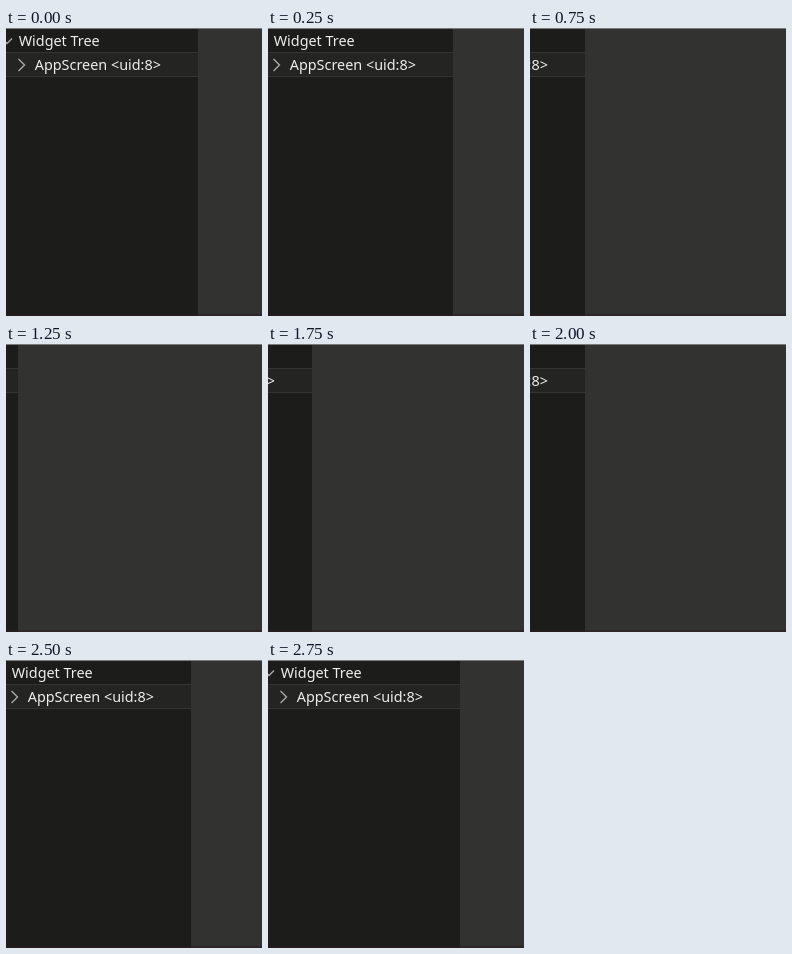
Animation of 256 by 288 pixels, one loop 3000 ms. Source, as an HTML page:

```html
<!DOCTYPE html>
<html lang="en">
<head>
<meta charset="utf-8">
<title>Sliding widget tree</title>
<style>
  html, body {
    margin: 0;
    width: 100%;
    height: 100%;
    overflow: hidden;
    background: #323331;
  }
  svg {
    display: block;
    width: 256px;
    height: 288px;
  }
  text {
    font: 14.4px "Noto Sans", sans-serif;
    fill: #eeefed;
  }
  .chevron {
    fill: none;
    stroke: #a9aaa8;
    stroke-width: 1.4;
  }
  .panel {
    animation: slide 3s step-end infinite;
  }
  @keyframes slide {
    0%, 91.6667% { transform: translateX(0); }
    8.3333%, 83.3333% { transform: translateX(-7px); }
    16.6667%, 75% { transform: translateX(-49px); }
    25%, 66.6667% { transform: translateX(-137px); }
    33.3333%, 58.3333% { transform: translateX(-148px); }
    41.6667% { transform: translateX(-180px); }
    100% { transform: translateX(0); }
  }
</style>
</head>
<body>
<svg viewBox="0 0 256 288">
  <rect width="256" height="288" fill="#323331"/>
  <g class="panel">
    <rect width="192" height="288" fill="#1c1d1a"/>
    <rect y="24" width="192" height="25" fill="#343533"/>
    <rect y="25" width="192" height="23" fill="#242523"/>
    <path class="chevron" d="M-4 10.5 1 15.5 6 10.5"/>
    <path class="chevron" d="M12.5 31 18.5 37 12.5 43"/>
    <text x="12.7" y="18">Widget Tree</text>
    <text x="28.7" y="42">AppScreen &lt;uid:8&gt;</text>
  </g>
  <rect width="256" height="1" fill="#797a79"/>
  <rect y="286" width="256" height="2" fill="#281f20" opacity=".6"/>
</svg>
</body>
</html>
```
